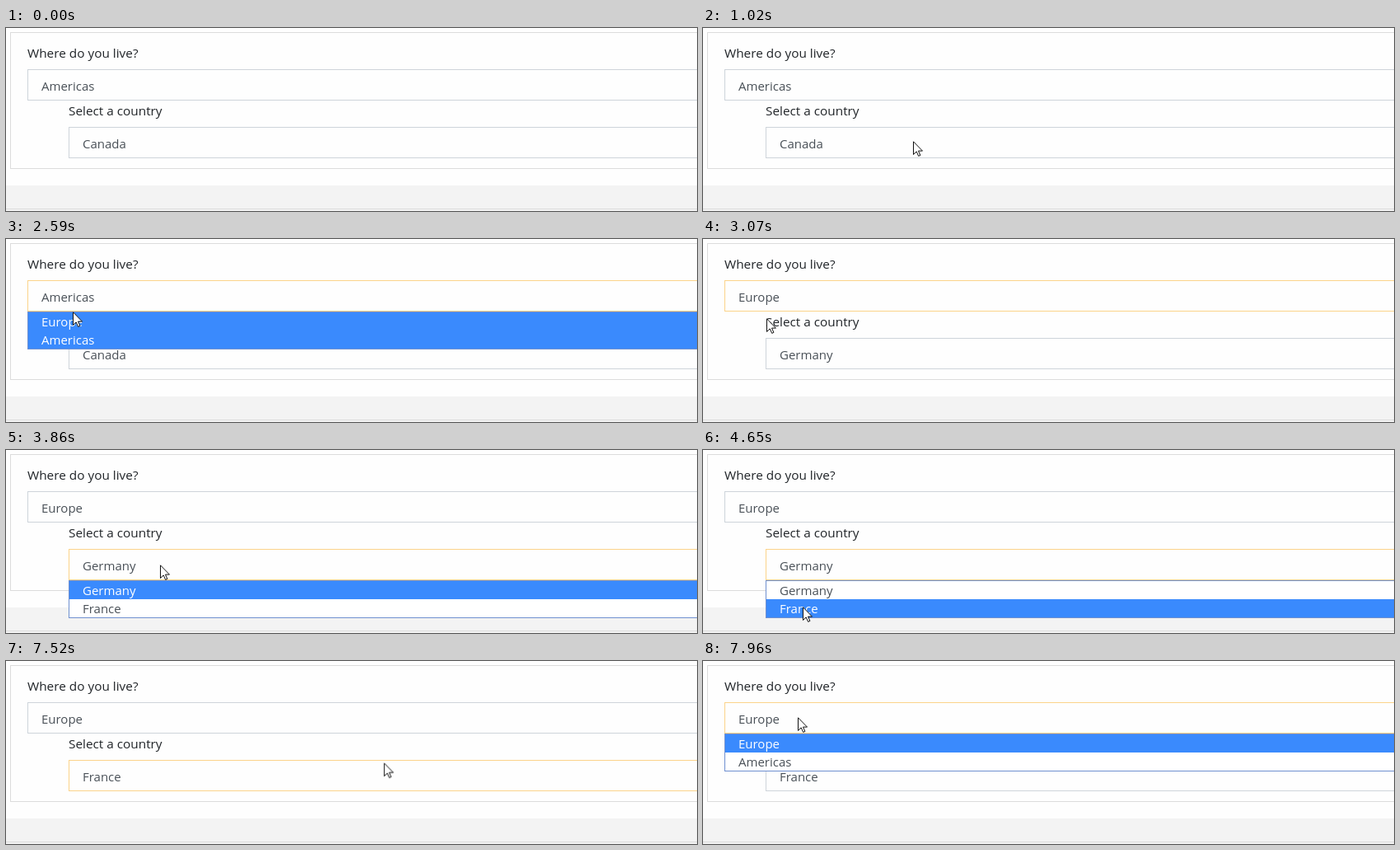
An HTML page for the animation above (8000 ms loop, 839 by 222 pixels).

```html
<!DOCTYPE html>
<html lang="en">
<head>
<meta charset="utf-8">
<title>Dependent selects</title>
<style>
  html, body { margin: 0; width: 100%; height: 100%; overflow: hidden; background: #fefefe; }
  svg { display: block; }
  text { font: 15px "Open Sans", "Noto Sans", sans-serif; fill: #495057; }
  .label { font-size: 15.35px; fill: #212529; }
  .box { fill: #fefefe; stroke: #ced4da; }
  .focus { fill: none; stroke: #fbd38a; }
  .popup > .frame { fill: #fff; stroke: #6f90d0; }
  .hot rect { fill: #3a8afd; }
  .hot text { fill: #fff; }

  /* Percentages are milliseconds / 80. */
  .show { visibility: hidden; animation: 8s step-end infinite; }
  .before-region { animation-name: before-region; }
  .after-region { animation-name: after-region; }
  .germany { animation-name: germany; }
  .france { animation-name: france; }
  .focus1 { animation-name: focus1; }
  .focus2 { animation-name: focus2; }
  .popup1 { animation-name: popup1; }
  .popup2 { animation-name: popup2; }
  .hot-americas { animation-name: hot-americas; }
  .hot-europe { animation-name: hot-europe; }
  .hot-germany { animation-name: hot-germany; }
  .hot-france { animation-name: hot-france; }

  @keyframes before-region { 0% { visibility: visible } 38.375%, 100% { visibility: hidden } }
  @keyframes after-region { 0% { visibility: hidden } 38.375%, 100% { visibility: visible } }
  @keyframes germany { 0%, 65.875%, 100% { visibility: hidden } 38.375% { visibility: visible } }
  @keyframes france { 0% { visibility: hidden } 65.875%, 100% { visibility: visible } }
  @keyframes focus1 { 0%, 48.25% { visibility: hidden } 25.875%, 98.75%, 100% { visibility: visible } }
  @keyframes focus2 { 0%, 98.75%, 100% { visibility: hidden } 48.25% { visibility: visible } }
  @keyframes popup1 { 0%, 38.375% { visibility: hidden } 26.625%, 99.5%, 100% { visibility: visible } }
  @keyframes popup2 { 0%, 65.875%, 100% { visibility: hidden } 48.25% { visibility: visible } }
  @keyframes hot-americas { 0%, 32.75%, 100% { visibility: hidden } 26.625% { visibility: visible } }
  @keyframes hot-europe { 0%, 38.375% { visibility: hidden } 32.75%, 99.5%, 100% { visibility: visible } }
  @keyframes hot-germany { 0%, 57%, 100% { visibility: hidden } 48.25% { visibility: visible } }
  @keyframes hot-france { 0%, 65.875%, 100% { visibility: hidden } 57% { visibility: visible } }

  .cursor { animation: cursor 8s step-end infinite; }
  @keyframes cursor {
    0% { transform: translate(679px, 230px) }
    5.75% { transform: translate(679px, 220px) }
    6.5% { transform: translate(672px, 220px) }
    9.25% { transform: translate(672px, 220px); animation-timing-function: steps(5, jump-start) }
    12.75% { transform: translate(255px, 137px); animation-timing-function: steps(7, jump-end) }
    17.125% { transform: translate(84px, 56px) }
    20.25% { transform: translate(82px, 66px) }
    20.625% { transform: translate(81px, 76px) }
    23.625% { transform: translate(81px, 77px) }
    31.75% { transform: translate(81px, 77px); animation-timing-function: steps(2, jump-start) }
    32.375% { transform: translate(81px, 88px); animation-timing-function: steps(4, jump-end) }
    34.125% { transform: translate(77px, 96px) }
    43% { transform: translate(77px, 96px); animation-timing-function: steps(3, jump-both) }
    44.75% { transform: translate(187px, 139px) }
    54% { transform: translate(187px, 139px); animation-timing-function: steps(8, jump-both) }
    58.125% { transform: translate(121px, 190px) }
    74.125% { transform: translate(121px, 190px); animation-timing-function: steps(4, jump-both) }
    76.625% { transform: translate(833px, 226px) }
    92.625% { transform: translate(845px, 163px); animation-timing-function: steps(4, jump-start) }
    95% { transform: translate(330px, 110px); animation-timing-function: steps(4, jump-end) }
    97.5%, 100% { transform: translate(115px, 68px) }
  }
</style>
</head>
<body>
<svg width="839" height="222" viewBox="0 0 839 222">
  <rect y="191" width="839" height="31" fill="#f3f3f3"/>
  <rect y="219" width="839" height="1" fill="#dcdcdc"/>
  <rect x="5.5" y="5.5" width="900" height="165" fill="#fefefe" stroke="#dcdcdc"/>

  <text class="label" x="26" y="36">Where do you live?</text>
  <rect class="box" x="26.5" y="50.5" width="900" height="37"/>
  <rect class="focus show focus1" x="26.5" y="50.5" width="900" height="37"/>
  <text class="show before-region" x="43" y="76">Americas</text>
  <text class="show after-region" x="43" y="76">Europe</text>

  <text class="label" x="76" y="106">Select a country</text>
  <rect class="box" x="76.5" y="120.5" width="900" height="37"/>
  <rect class="focus show focus2" x="76.5" y="120.5" width="900" height="37"/>
  <text class="show before-region" x="93" y="146">Canada</text>
  <text class="show germany" x="93" y="146">Germany</text>
  <text class="show france" x="93" y="146">France</text>

  <g class="popup show popup1">
    <rect class="frame" x="26.5" y="88.5" width="900" height="45"/>
    <text x="43" y="106">Europe</text>
    <text x="43" y="128">Americas</text>
  </g>
  <g class="hot show hot-europe">
    <g class="show popup1">
      <rect x="27" y="89" width="900" height="22"/>
      <text x="43" y="106">Europe</text>
    </g>
  </g>
  <g class="hot show hot-americas">
    <rect x="27" y="111" width="900" height="22"/>
    <text x="43" y="128">Americas</text>
  </g>

  <g class="popup show popup2">
    <rect class="frame" x="76.5" y="158.5" width="900" height="45"/>
    <text x="93" y="176">Germany</text>
    <text x="93" y="198">France</text>
  </g>
  <g class="hot show hot-germany">
    <rect x="77" y="159" width="900" height="22"/>
    <text x="93" y="176">Germany</text>
  </g>
  <g class="hot show hot-france">
    <rect x="77" y="181" width="900" height="22"/>
    <text x="93" y="198">France</text>
  </g>

  <path class="cursor" d="M.5 .8V16.5L4.2 12.9L6.7 18.4L8.9 17.4L6.5 12.1H11.5Z" fill="#fff" stroke="#111"/>
</svg>
</body>
</html>
```
